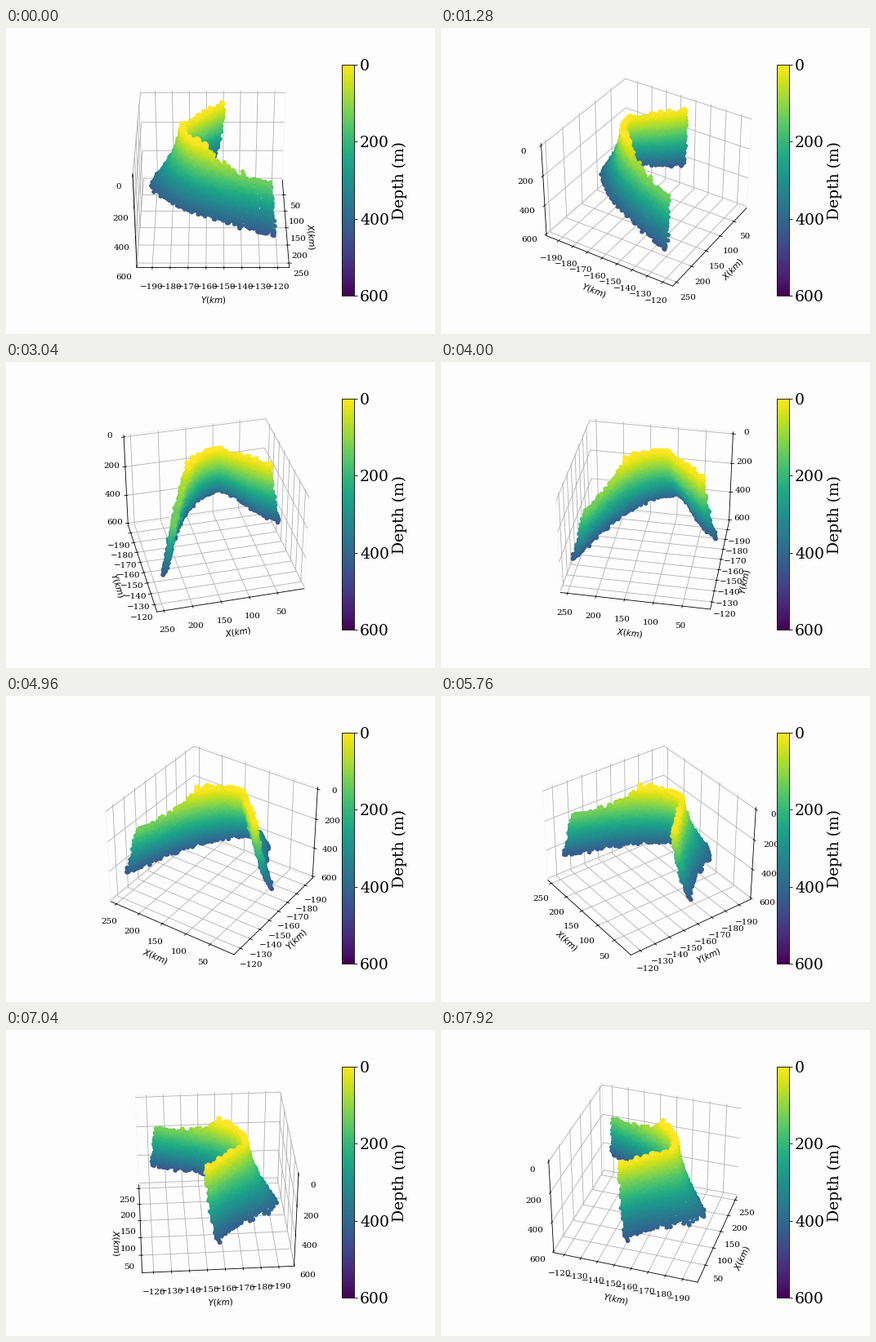
These frames come from a looping animation (525 px wide and 375 px high, 8000 ms). A matplotlib script:

```python
import numpy as np
import matplotlib.pyplot as plt
from matplotlib.animation import FuncAnimation

FRAMES, INTERVAL = 100, 80
DEGREES_PER_FRAME = 2
BACKGROUND = "#fdfdfd"

plt.rcParams.update({
    "font.family": "serif",
    "font.serif": ["DejaVu Serif"],
    "font.size": 10,
    "mathtext.fontset": "dejavusans",
})


def bell(t, center, width):
    return np.exp(-((t - center) / width) ** 2)


def upper_edge(t):
    """Map position of the crest; t runs -1 .. 0 on the short arm, 0 .. 1 on the long one."""
    x = 108 + np.where(t < 0, 72, 111) * t
    y = -173.5 + np.where(t < 0, 23 * np.abs(t) ** 1.1, 48 * np.abs(t) ** 2.4)
    return x, y


def dip_offset(t):
    """Horizontal shift from the crest to the deepest points."""
    return 24 * np.tanh(3.5 * (t - 0.12)), 4.5 * t - 1 - 17 * bell(t, 0, 0.4)


def depth_range(t, rng):
    """Ragged top and bottom depth of each column."""
    top = 10 + 138 / (1 + np.exp((0.72 - t) / 0.05))
    for spire in (0.5, 0.865):
        top -= 55 * bell(t, spire, 0.013)
    bumps = np.repeat(rng.normal(0, 1, t.size // 3 + 1), 3)[:t.size]
    top += bumps * np.where(t > 0.4, 18, 8)
    bottom = 410 + 25 * t ** 2
    return np.maximum(top, -20), bottom, bottom + rng.normal(0, 9, t.size)


def make_slab(columns=135, layer=15):
    """Points of a curved dipping sheet, stacked in even depth layers."""
    rng = np.random.default_rng(4)
    s = np.linspace(-1, 2, columns)
    t = np.where(s < 0, s, s / 2)
    x0, y0 = upper_edge(t)
    dx, dy = dip_offset(t)
    top, bottom, ragged_bottom = depth_range(t, rng)

    z, col = np.meshgrid(np.arange(-15, 480, layer), np.arange(columns), indexing="ij")
    keep = (z >= top[col] - layer / 2) & (z <= ragged_bottom[col])
    z, col = z[keep], col[keep]
    dip = (np.maximum(z, 0) / bottom[col]) ** 1.65
    x = x0[col] + dx[col] * dip + rng.normal(0, 1.6, z.size)
    y = y0[col] + dy[col] * dip + rng.normal(0, 0.5, z.size)
    return x, y, z


fig = plt.figure(figsize=(7, 5), dpi=75, facecolor=BACKGROUND)
fig.subplots_adjust(left=0.125, right=0.9, bottom=0.125, top=0.88)
ax = fig.add_subplot(projection="3d", facecolor=BACKGROUND)

x, y, z = make_slab()
points = ax.scatter(x, y, z, c=z, s=20, vmin=0, vmax=600,
                    cmap="viridis_r", depthshade=False)

ax.set_xlim(2, 262)
ax.set_ylim(-198.6, -113.6)
ax.set_zlim(612.5, -12.5)
ax.set_xticks(range(50, 251, 50))
ax.set_yticks(range(-190, -119, 10))
ax.set_zticks(range(0, 601, 200))
ax.tick_params(axis="x", pad=4.2)
ax.tick_params(axis="y", pad=4.2)
ax.set_xlabel("$X(km)$")
ax.set_ylabel("$Y(km)$")
for axis in (ax.xaxis, ax.yaxis, ax.zaxis):
    axis.pane.fill = False

bar = fig.colorbar(points, ax=ax, ticks=range(0, 601, 200))
bar.ax.invert_yaxis()
bar.ax.tick_params(labelsize=18)
bar.set_label("Depth (m)", size=18)


def update(frame):
    # The small offset keeps the axis sides well defined at right angles
    ax.view_init(elev=35, azim=DEGREES_PER_FRAME * frame + 0.01)
    return (points,)


animation = FuncAnimation(fig, update, frames=FRAMES, interval=INTERVAL,
                          repeat=True, repeat_delay=0)
plt.show()
```
